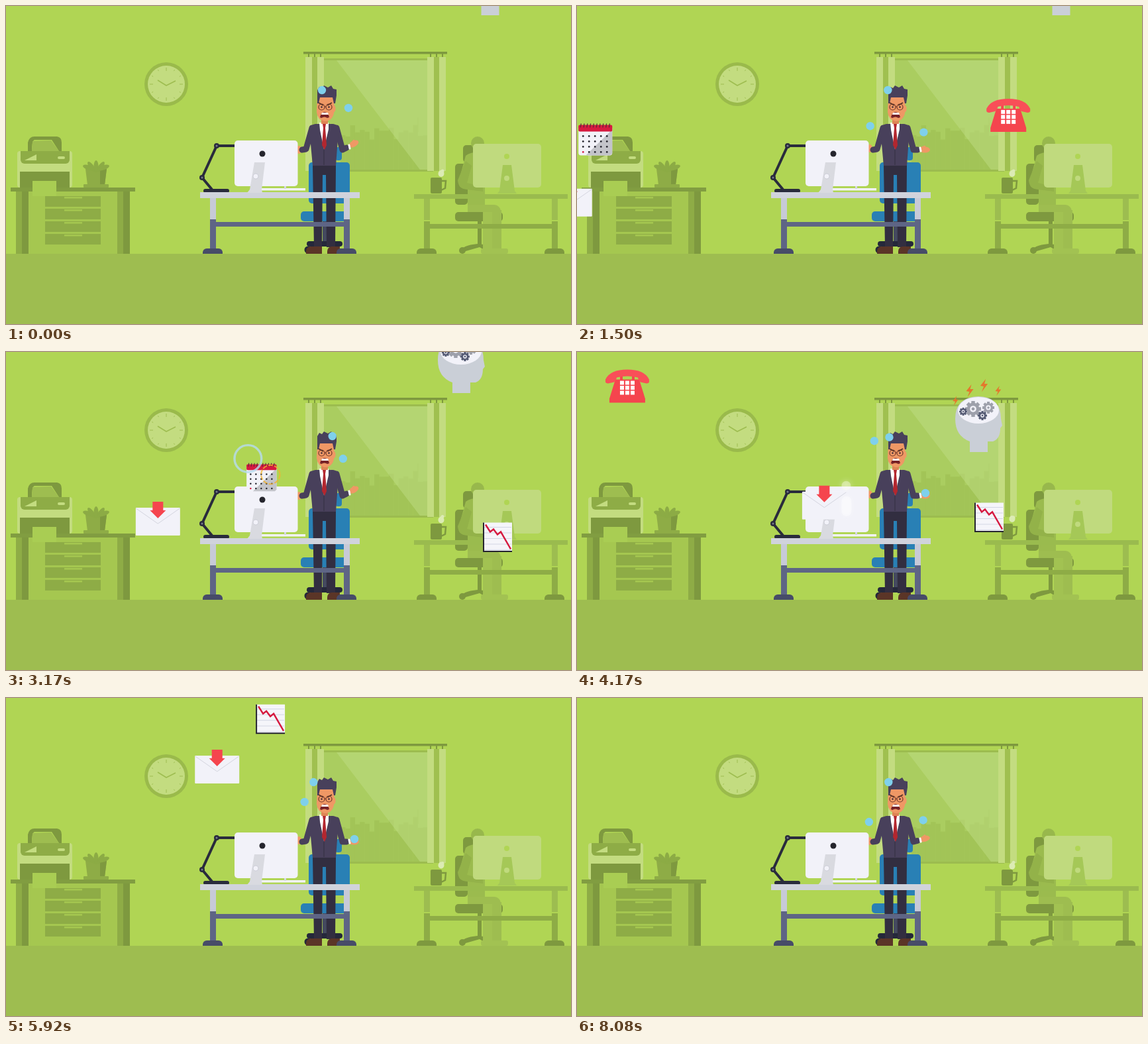
These frames come from a looping animation (853 px wide and 480 px high, 8.16 s). An HTML page with a canvas:

```html
<!DOCTYPE html>
<html lang="en">
<head>
<meta charset="utf-8">
<title>Busy office</title>
<style>
html, body { margin: 0; width: 100%; height: 100%; overflow: hidden; background: #b0d554; }
canvas { display: block; width: 853px; height: 480px; }
</style>
</head>
<body>
<canvas id="stage" width="853" height="480"></canvas>
<script>
const g = document.getElementById('stage').getContext('2d');
const LOOP = 8160, FRAMES = 98, TAU = Math.PI * 2;
const DARK = '#7e993f', MID = '#8eac46', SOFT = '#9ebd50', PALE = '#c3dc80', WALL = '#b0d554';
const INK = '#292b3c', RED = '#f5454e', CRIMSON = '#d61a40', WHITE = '#f2f2f9', BLUE = '#2980b5';

// Drawing helpers
function rect(x, y, w, h, color, r = 0) {
  g.fillStyle = color;
  g.beginPath();
  g.roundRect(x, y, w, h, r);
  g.fill();
}
function trace(points) {
  g.beginPath();
  for (let i = 0; i < points.length; i += 2) g.lineTo(points[i], points[i + 1]);
}
function poly(color, ...points) {
  trace(points);
  g.fillStyle = color;
  g.fill();
}
function line(color, width, ...points) {
  trace(points);
  g.strokeStyle = color;
  g.lineWidth = width;
  g.stroke();
}
function shape(color, d) {
  g.fillStyle = color;
  g.fill(new Path2D(d));
}
function disc(x, y, r, color, ry = r, turn = 0) {
  g.fillStyle = color;
  g.beginPath();
  g.ellipse(x, y, r, ry, turn, 0, TAU);
  g.fill();
}
function ring(x, y, r, color, width) {
  g.strokeStyle = color;
  g.lineWidth = width;
  g.beginPath();
  g.arc(x, y, r, 0, TAU);
  g.stroke();
}
function spoke(x, y, from, to, angle, color, width) {
  const c = Math.cos(angle), s = Math.sin(angle);
  line(color, width, x + from * c, y + from * s, x + to * c, y + to * s);
}
function at(x, y, scale, draw) {
  g.save();
  g.translate(x, y);
  g.scale(scale, scale);
  draw();
  g.restore();
}
const clamp = v => Math.max(0, Math.min(1, v));
const mix = (a, b, k) => a + (b - a) * k;
const mod = (v, n) => (v % n + n) % n;

// Room
function clock() {
  disc(242, 118, 33, '#9aba4b');
  disc(242, 118, 28, PALE);
  for (let i = 0; i < 12; i++) spoke(242, 118, i % 3 ? 23 : 20, 25, i * TAU / 12, SOFT, 1);
  line(SOFT, 1.6, 229, 112, 242, 120, 256, 113);
}

function curtain(x) {
  rect(x, 77, 28, 172, PALE);
  rect(x + 10, 77, 8, 172, '#a0c050');
  for (let i = 0; i < 3; i++) rect(x + 4 + i * 9, 71, 2, 6, DARK);
}

function windowView() {
  rect(471, 79, 174, 171, '#9cbc4f');
  rect(473, 82, 170, 165, '#aacd60');
  for (let i = 0; i < 18; i++) {
    const top = 190 + 7 * Math.sin(i * 2.4) + 5 * Math.cos(i * 1.1);
    rect(505 + i * 7.3, top, 7.4, 247 - top, '#a2c457');
  }
  line('#a2c457', 1, 622, 168, 622, 190);
  g.globalAlpha = .5;
  poly('#c0dd83', 499, 82, 637, 82, 637, 247, 625, 247);
  g.globalAlpha = 1;
  curtain(452);
  curtain(636);
  rect(449, 69, 217, 3.5, DARK);
}

function cabinet() {
  rect(33, 280, 135, 94, '#a5c750');
  for (const x of [15, 168]) {
    rect(x, 280, 9, 94, MID);
    rect(x + 9, 280, 10, 94, DARK);
  }
  rect(7, 274, 188, 6, '#819d41');
  for (let y = 287; y < 350; y += 19) {
    rect(59, y, 84, 16, MID);
    rect(88, y + 1, 27, 2.5, '#a5c750');
  }
}

function printer() {
  rect(17, 219, 83, 55, PALE, 4);
  shape(DARK, 'M33 219V206Q35 197 43 197H77Q84 198 84 206V219H80L69 202H43Q39 203 39 219Z');
  poly(SOFT, 39, 219, 40, 204, 68, 203, 80, 219);
  rect(22, 219, 74, 19, MID, [0, 0, 6, 6]);
  poly(PALE, 28, 233, 46, 224, 46, 233);
  rect(78, 227, 11, 4, PALE, 2);
  rect(21, 250, 75, 24, DARK);
  rect(40, 264, 36, 23, '#a9cd53');
}

function plant() {
  poly(MID, 120, 246, 152, 246, 149, 270, 123, 270);
  poly(DARK, 142, 246, 152, 246, 149, 270, 142, 270);
  rect(117, 269, 38, 5, MID, 1);
  for (let i = -2; i <= 2; i++) {
    const a = i * .62 - TAU / 4;
    disc(136 + 12 * Math.cos(a), 245 + 3 * Math.sin(a), 9, '#8cab45', 3.5, a);
  }
}

function desk(x, width, top, height, board, upper, lower, foot) {
  const left = x + 15, right = x + width - 24;
  for (const leg of [left, right]) {
    rect(leg, top + height, 9, 32, upper);
    rect(leg, top + 41, 9, 46, lower);
    rect(leg - 11, 366, 30, 8, foot, [6, 6, 0, 0]);
  }
  rect(left + 5, top + 45, right - left, 7, lower);
  rect(x, top, width, height, board);
}

function coworker(t) {
  rect(678, 238, 19, 62, DARK, 5);
  rect(690, 210, 17, 26, DARK, 5);
  rect(712, 325, 6, 35, DARK);
  shape(DARK, 'M686 371Q688 361 712 359Q735 360 735 372H728L715 364L694 370Z');
  disc(689, 369, 5, DARK);
  disc(712, 207, 10, '#98b84c');
  rect(707, 210, 10, 20, SOFT);
  shape('#9bbb4e', 'M694 226Q710 215 723 230V303H697V276Q681 277 684 262Z');
  shape('#93b249', 'M694 234L682 263Q683 276 696 277L720 280V273L696 267L703 241Z');
  rect(697, 300, 50, 14, SOFT, [0, 10, 0, 0]);
  rect(678, 311, 72, 14, DARK, 5);
  rect(720, 311, 16, 56, '#a2c252');
  rect(734, 308, 14, 64, SOFT);
  rect(717, 366, 41, 8, '#a2c252', 3);
  desk(616, 232, 284, 7, '#9abb4e', '#9dbd50', MID, DARK);
  rect(705, 208, 103, 66, '#c0da7e', 5);
  disc(756, 227, 4, WALL);
  poly('#a5c857', 750, 240, 763, 240, 768, 279, 771, 283, 742, 283, 745, 279);
  disc(756, 260, 4, '#c0da7e');
  rect(641, 259, 17, 24, DARK, 2);
  line(DARK, 2.5, 657, 264, 664, 264, 663, 275, 657, 278);
  const puff = Math.sin(t / 240);
  disc(657, 253 + puff, 4.5, '#dcebb4', 5);
  disc(659, 249 - puff, 2.5, '#dcebb4');
}

// Three-ball cascade: a flight across, a short hold, then back
function ball(phase) {
  const u = mod(phase + .56, 3), s = clamp(u % 1.5 / 1.1);
  const [from, to] = u < 1.5 ? [526, 432] : [432, 526];
  disc(mix(from, to, s ** .75), 127 + 86 * (2 * s - 1) ** 4, 6.2, '#7fd0ec');
}

function chair() {
  rect(497, 213, 10, 20, BLUE, 4);
  rect(457, 236, 62, 62, BLUE, 5);
  rect(445, 310, 74, 15, BLUE, 5);
  rect(478, 325, 6, 34, '#44495f');
  rect(454, 355, 54, 8, '#25283a', 4);
  disc(456, 368, 5.5, '#25283a');
}

function man(phase) {
  const skin = '#ef9865', suit = '#48405b', pants = '#322e40', frame = '#713729';
  const k = mod(phase, 1), lift = clamp((k - .35) * 6) * clamp((1 - k) * 40);
  poly(pants, 463, 240, 498, 240, 497, 364, 484, 364, 483, 255, 478, 255, 477, 364, 465, 364);
  for (const x of [453, 485]) rect(x, 363, x < 470 ? 24 : 19, 11, '#5b3527', [7, 0, 0, 0]);

  g.lineCap = g.lineJoin = 'round';
  disc(442, 215 + 2 * lift, 4, skin, 6);
  line(suit, 9, 462, 184, 453, 216, 447, 217);
  disc(525, 217 - 9 * lift, 8, skin, 4.5, -.5 * lift);
  line(skin, 2.5, 520, 214 - 5 * lift, 525, 212 - 9 * lift);
  line(suit, 9, 499, 184, 508, 217, 514, 217 - 3 * lift);
  line('#fff', 3, 518, 214 - 4 * lift, 519, 219 - 4 * lift);
  g.lineCap = 'butt';
  g.lineJoin = 'miter';

  shape(suit, 'M467 178H494Q502 179 502 187L498 241H463L458 187Q459 179 467 178Z');
  poly('#fff', 473, 176, 487, 176, 487, 186, 480, 216, 474, 187);
  rect(476, 166, 10, 12, '#dd8555');
  poly('#b3272f', 478, 178, 483, 178, 482, 184, 484, 210, 481, 217, 477, 210, 479, 184);
  line('#332e43', 1, 480, 217, 480, 240);

  // Head
  shape(skin, 'M470 136H496L495 162Q492 174 481 174Q470 172 469 160Z');
  disc(495, 155, 2.5, skin, 5);
  shape(suit, 'M470 147V127L473 122L477 124L480 120L486 123L491 120L494 125L499 126V135L497 147H495L493 138H474L472 147Z');
  line('#543426', 1.8, 472, 146, 479, 150);
  line('#543426', 1.8, 492, 146, 485, 150);
  for (const x of [476.5, 487.5]) {
    ring(x, 152.5, 4.5, frame, 1.2);
    disc(x, 152.5, 1.2, '#332638');
  }
  line(frame, 1.2, 481, 152, 483, 152);
  shape('#762127', 'M474 168Q476 160 481 160Q486 160 488 168L485 169Q481 166 476 169Z');
  poly('#fff', 477, 161, 486, 161, 487, 164, 476, 164);
}

function workplace() {
  g.lineJoin = 'round';
  line(INK, 4, 311, 277, 296, 259, 318, 211, 346, 211);
  g.lineJoin = 'miter';
  for (const [x, y] of [[296, 259], [318, 211]]) {
    disc(x, y, 4, INK);
    disc(x, y, 1.5, '#777b8c');
  }
  rect(298, 276, 39, 6, INK, 3);
  desk(293, 241, 281, 9, '#d0d3dc', '#c7cad7', '#5e6585', '#474c68');
  rect(345, 203, 95.5, 69, WHITE, 5);
  disc(387, 223, 4.5, '#25252d');
  rect(384, 275, 68, 3.5, WHITE);
  rect(420, 272, 3, 4, '#d5d7df');
  poly('#d9dae0', 375, 236, 391, 236, 386, 277, 387, 282, 364, 282, 368, 277);
  disc(377, 257, 4, WHITE);
  ring(377, 257, 4, '#c3c5ce', .7);
}

// Flying things, each drawn around its own centre
function phone() {
  poly(RED, -18, -10, 18, -10, 27, 19, 27, 25, -27, 25, -27, 19);
  rect(-11, -16, 4, 8, RED);
  rect(7, -16, 4, 8, RED);
  shape('#f94f58', 'M-33 -10Q-26 -25 0 -25Q26 -25 33 -10V-6Q32 -4 29 -4L20 -6Q17 -8 16 -13Q0 -17 -16 -13Q-17 -8 -20 -6L-29 -4Q-32 -4 -33 -6Z');
  for (let i = 0; i < 9; i++) rect(-11 + i % 3 * 8, -8 + Math.floor(i / 3) * 7.5, 6, 6, '#fff');
}

function calendar() {
  rect(-25, -17, 51, 41, WHITE, [0, 0, 4, 4]);
  poly('#c3c4ca', 26, -15, 26, 21, 23, 24, -14, 24);
  rect(-25, -22, 51, 10, CRIMSON, 2);
  for (let i = 0; i < 10; i++) line('#5a2439', 1.2, -21 + i * 4.8, -24, -22 + i * 4.8, -18);
  for (let i = 0; i < 20; i++)
    disc(-18 + i % 5 * 9, -5 + Math.floor(i / 5) * 8, 1.4, i === 15 ? CRIMSON : '#25252f');
}

function envelope() {
  rect(-33.5, -21, 67, 42, WHITE, 1);
  line('#d4d5df', 1, -33, -20, 0, 3, 33, -20);
  poly(RED, -8, -30, 8, -30, 8, -17, 12, -17, 0, -5, -12, -17, -8, -17);
}

function chart() {
  rect(-22, -22, 44, 44, '#f5f5fa');
  for (let y = -15; y < 20; y += 8.5) line('#d3d6e4', 1, -20, y, 21, y);
  line('#25252f', 2, -21, -22, -21, 21.5, 22, 21.5);
  line(CRIMSON, 2.5, -18, -19, -11, -8, -6, -12, 0, -4, 5, -8, 20, 18);
}

function gear(x, y, r, color) {
  for (let i = 0; i < 8; i++) spoke(x, y, 0, r, i * TAU / 8, color, r * .45);
  disc(x, y, r * .78, color);
  disc(x, y, r * .4, WHITE);
  disc(x, y, r * .2, color);
}

function mind(t) {
  shape('#cacfd7', 'M-35 -8Q-35 -41 0 -42Q34 -41 34 -8L36 2L33 6Q33 22 22 26H14V42H-13V26Q-35 18 -35 -8Z');
  disc(0, -21, 31, WHITE, 20);
  gear(-8, -23, 12, '#9da0ab');
  gear(15, -25, 9, '#9da0ab');
  gear(-23, -19, 6, '#555b74');
  gear(6, -13, 7, '#555b74');
  if (t < 3700 || t > 4890) return;
  for (let i = 0; i < 4; i++) {
    const y = -36 - 22 * Math.sin(i * .8) + Math.sin(t / 60 + i * 2);
    at(-35 + 21.5 * i, y, .75 + .3 * Math.sin(i), () =>
      poly('#e4772d', 3, -9, -5, 1, 0, 2, -3, 10, 6, -2, 1, -2));
  }
}

// Bursts; k runs from 0 to 1
function rings(k) {
  g.globalAlpha = 1 - k * k * .6;
  ring(-20, -28, 10 + 18 * k, '#b7ddf0', 4 - k);
  g.setLineDash([7, 2]);
  ring(14, -4, 5 + 16 * k, '#f3b32f', 2);
}
function star(k) {
  const r = 87 * Math.sin(Math.PI * k), a = r * .14, b = r * .25, c = r * .4;
  g.translate(2, -11);
  for (let i = 0; i < 4; i++) {
    shape('#fbfde9', `M0 0L0 ${-r}Q${a} ${-c} ${b} ${-b}Q${c} ${-a} ${r} 0Z`);
    g.rotate(TAU / 4);
  }
  disc(0, 0, b, '#fbfde9');
}
function glow(k) {
  g.globalAlpha = Math.sin(Math.PI * k);
  g.shadowColor = '#fff';
  g.shadowBlur = 10;
  disc(33, -30, 6 + 8 * k, '#fffff0');
  rect(26, -14, 15, 30, '#fff', 7);
}

// Straight flight from an entry point to the place where the thing bursts
function fly(t, draw, burst, start, end, [x0, y0], [x1, y1]) {
  const way = clamp((t - start) / (end - start));
  const x = mix(x0, x1, way), y = mix(y0, y1, way), k = (t - end + 260) / 220;
  if (t < end) at(x, y, clamp((end - t) / 150), () => draw(t));
  if (k > 0 && k < 1) at(x, y, 1, () => burst(k));
}
function flights(t) {
  fly(t, phone, rings, 500, 2080, [905, 63], [504, 224]);
  fly(t, calendar, rings, 1150, 3300, [-48, 204], [414, 188]);
  fly(t, envelope, glow, 1200, 4400, [-54, 304], [407, 226]);
  fly(t, mind, star, 2628, 5150, [730.5, -28], [526.5, 196.5]);
  fly(t, chart, rings, 2000, 5300, [882, 314.5], [486, 215.5]);
  fly(t, phone, rings, 3600, 5480, [-68, -2], [409.5, 175.5]);
  fly(t, envelope, glow, 4400, 6850, [211, -49], [385, 204.5]);
  fly(t, chart, rings, 5200, 7300, [367, -40], [461, 170]);
}

function render(now) {
  const t = Math.floor((now % LOOP + 2) * FRAMES / LOOP) % FRAMES * 1000 / 12;
  const phase = (t - 1500) / 366;
  rect(0, 0, 853, 480, WALL);
  rect(0, 374, 853, 106, SOFT);
  clock();
  windowView();
  cabinet();
  printer();
  plant();
  coworker(t);
  chair();
  man(phase);
  for (let i = 0; i < 3; i++) ball(phase + i);
  workplace();
  flights(t);
  requestAnimationFrame(render);
}
requestAnimationFrame(render);
</script>
</body>
</html>
```
